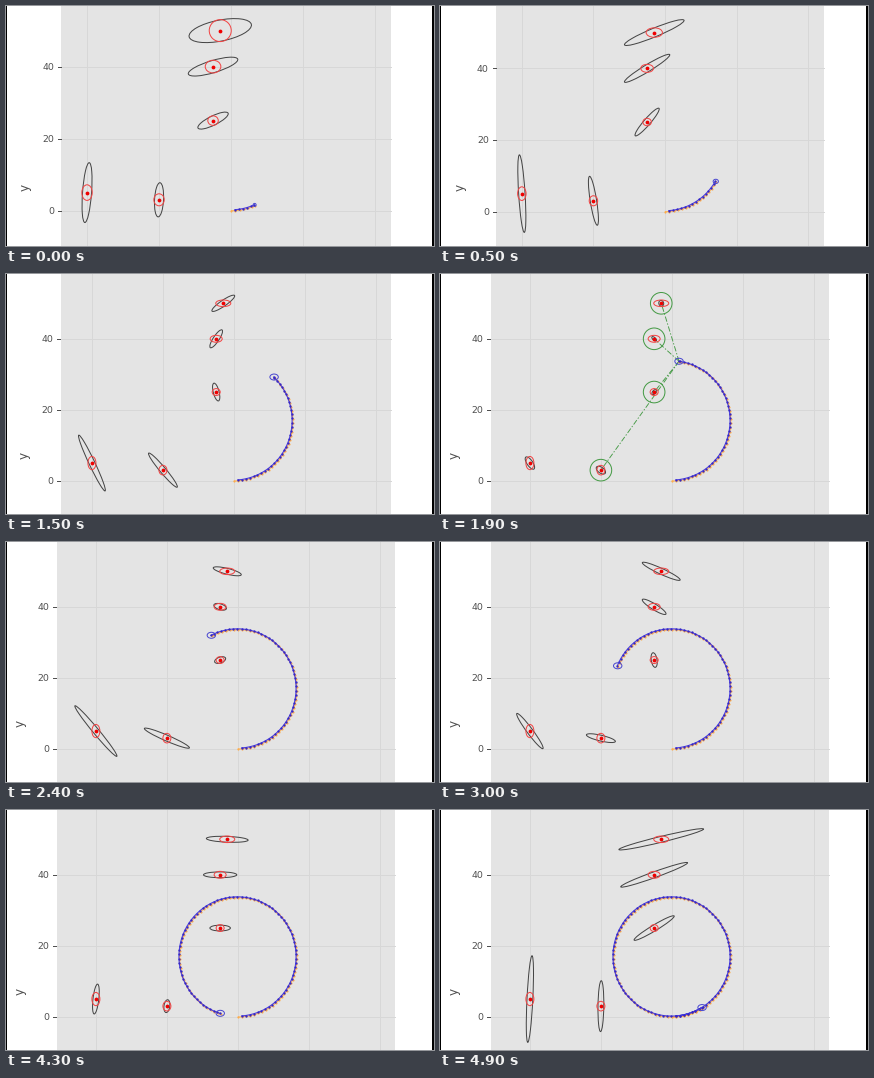
Animation of 428x240 px, one loop 5 s. Source, as a matplotlib script:

```python
import numpy as np
import matplotlib.pyplot as plt
from matplotlib.animation import FuncAnimation
from matplotlib.patches import Ellipse, Rectangle

W, H, FRAMES, PX = 428, 240, 50, 0.72
PLOT_CENTER, X_MAX = 220, 44.3
SENSOR_RANGE = 50
GRID, TEXT, GREEN = "#d7d7d7", "#505050", "#459a45"

LANDMARKS = np.array([(-40, 5), (-20, 3), (-5, 25), (-5, 40), (-3, 50)])
SCANS = np.array([-3, 1, 8, 13, 19, 26, 34, 42])

fig = plt.figure(figsize=(W / 100, H / 100), dpi=100, facecolor="white")
ax = fig.add_axes([0, 0, 1, 1])


def robot_angle(i):
    return np.interp(i, [0, 12, 19, 38, 49], [23.4, 109.5, 173, 302, 391])


def on_path(degrees):
    a = np.radians(degrees)
    return np.stack([16.5 * np.sin(a), 17 - 16.8 * np.cos(a)], axis=-1)


def view(i):
    """Left limit, pixels per unit and pixel origin of the autoscaled plot."""
    zoom_out = min(i / 12, 1)
    x_min = np.interp(i, [12, 19], [-47.1, -51])
    scale = 3.6 - 0.05 * zoom_out
    x0 = PLOT_CENTER - (X_MAX + x_min) / 2 * scale
    return x_min, scale, np.array([x0, 204.6 + 2.2 * zoom_out])


def ring(center, rx, ry, color, angle=0, width=1.0, z=4):
    ax.add_patch(Ellipse(center, 2 * rx, 2 * ry, angle=angle, fill=False,
                         ec=color, lw=width * PX, zorder=z))


def label(x, y, text, size, **style):
    ax.text(x, y, text, color=TEXT, fontsize=size * PX,
            family="DejaVu Sans", **style)


def draw_plot_area(x_min, scale, origin):
    x0, y0 = origin
    left, right = x0 + x_min * scale, x0 + X_MAX * scale
    ax.add_patch(Rectangle((left, -5), right - left, H + 10,
                           color="#e4e4e4", lw=0, zorder=0))
    for v in range(-40, 41, 20):
        ax.axvline(x0 + v * scale, color=GRID, lw=PX, zorder=1)
    for v in (0, 20, 40):
        y = y0 - v * scale
        ax.plot([left, right], [y, y], color=GRID, lw=PX, zorder=1)
        ax.plot([left - 3.5, left - 0.5], [y, y], color=TEXT, lw=PX)
        label(left - 7.5, y, v, 9.4, ha="right", va="center_baseline")
    label(left - 36.5, 181.5, "y", 12, rotation=90, ha="center", va="center")


def draw_trail(angle, to_px):
    x, y = to_px(on_path(np.append(np.arange(0, angle, 4), angle))).T
    ax.plot(x + 0.3, y + 0.9, color="#ffac48", lw=PX, marker="o",
            ms=2.1 * PX, mew=0, zorder=5)
    ax.plot(x[1:] - 0.4, y[1:], color="#4a3fe0", lw=1.1 * PX, marker="o",
            ms=2.3 * PX, mew=0, mfc="#3527c4", zorder=6)


def draw_landmark(mark, i, age, robot, to_px, scale):
    center, robot_px = to_px(mark), to_px(robot)
    dx, dy = center - robot_px
    distance = np.hypot(*(mark - robot))
    x, y = np.abs(mark)

    # First sightings are uncertain, most of all for the farthest landmark.
    fresh = np.exp(-i / 3)
    far = (y / 50) ** 6
    radial = 2.9 + fresh * (1.6 + 6 * far)
    spread = 0.04 + 0.08 * np.sqrt(age)
    ring(center, spread * distance * scale, radial, "#444444",
         np.degrees(np.arctan2(dy, dx)) + 90)
    ring(center, max(4, 0.15 * y) + fresh * (1.2 + 2.3 * far),
         3 + 0.09 * x + fresh * (1.2 + 6.5 * far), "#f24444")
    ax.plot(*center, "o", color="#f00000", ms=3.8 * PX, mew=0, zorder=5)

    if age == 0 and distance < SENSOR_RANGE:
        ring(center, 10.8, 10.8, GREEN)
        ax.plot(*zip(robot_px, center), color=GREEN, lw=0.9 * PX,
                ls=(0, (6, 2, 1.5, 2)), zorder=3)


def draw(i):
    ax.clear()
    ax.set(xlim=(0, W), ylim=(H, 0))
    ax.axis("off")
    x_min, scale, origin = view(i)

    def to_px(points):
        return origin + np.asarray(points) * [scale, -scale]

    angle = robot_angle(i)
    robot = on_path(angle)
    age = i - SCANS[SCANS <= i].max()
    draw_plot_area(x_min, scale, origin)
    for mark in LANDMARKS:
        draw_landmark(mark, i, age, robot, to_px, scale)
    draw_trail(angle, to_px)
    grown = min(i / 12, 1)
    ring(to_px(robot), 1.5 + 2.7 * grown, 1.5 + 1.5 * grown, "#4a48d0", z=7)
    for x, width in ((0, 1), (W - 2, 2)):
        ax.add_patch(Rectangle((x, 0), width, H, color="black", lw=0, zorder=9))
    return []


anim = FuncAnimation(fig, draw, frames=FRAMES, interval=100,
                     init_func=lambda: [], repeat=True, repeat_delay=0)
plt.show()
```
